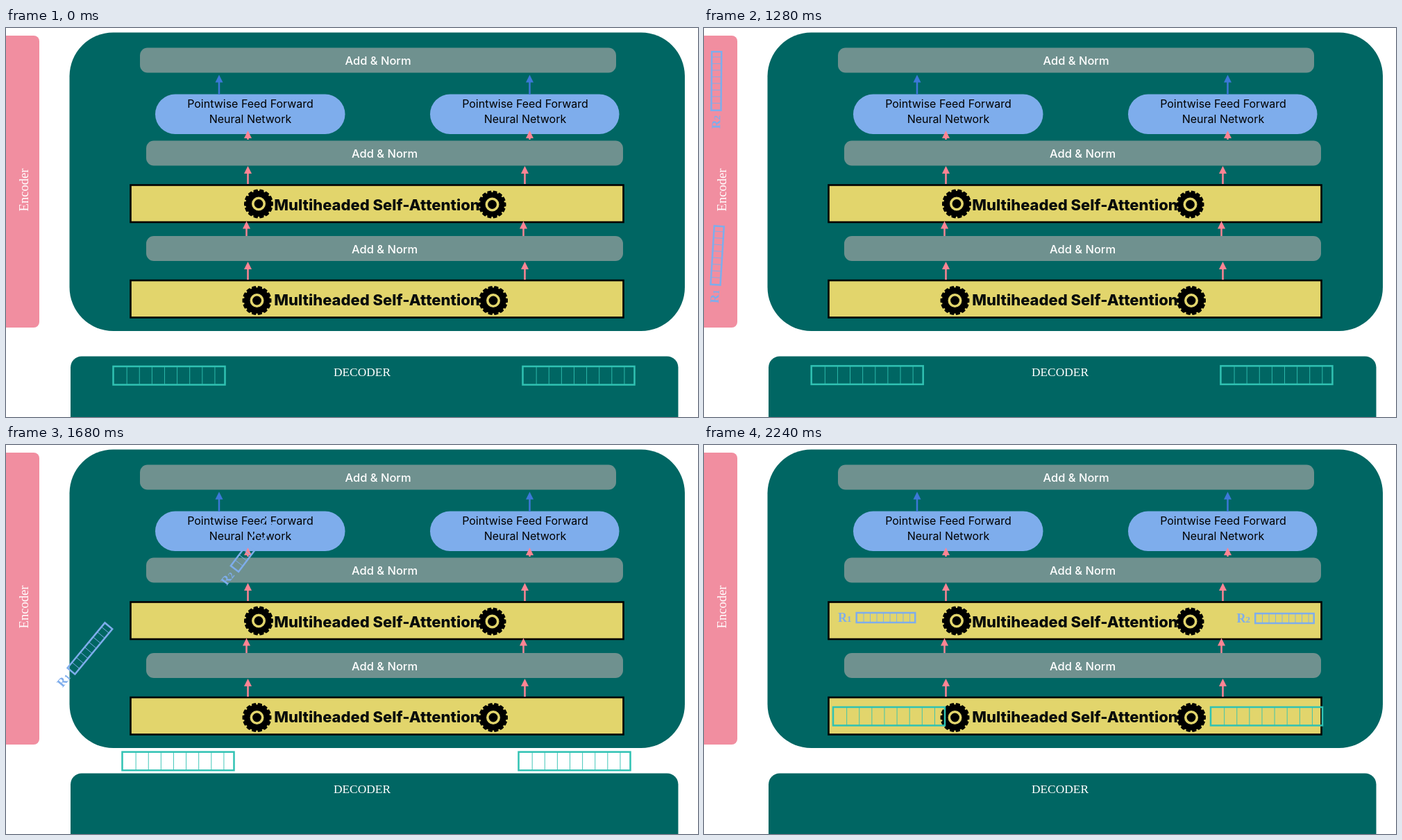
Recreate the animation shown at these times as an HTML page with a canvas. Size 997x561 px, loop 2.72 s.

```html
<!DOCTYPE html>
<html lang="en">
<head>
<meta charset="utf-8">
<title>Encoder and decoder</title>
<style>
html, body { margin: 0; width: 100%; height: 100%; overflow: hidden; background: #fff; }
canvas { display: block; }
</style>
</head>
<body>
<canvas id="stage" width="997" height="561"></canvas>
<script>
const ctx = document.getElementById('stage').getContext('2d');
const LOOP = 2720, STEP = 40;
const GREEN = '#006663', GREY = '#6f918f', BLUE = '#7eadec', YELLOW = '#e2d56c';
const PINK = '#f18ea0', ROSE = '#ff8494', ROYAL = '#3c78d8', TEAL = '#30c2b3', INK = '#060b0b';
const SANS = 'Inter, "Open Sans", sans-serif';
const SERIF = '"Liberation Serif", "Noto Serif", serif';

const clamp = v => Math.min(1, Math.max(0, v));
const lerp = (a, b, p) => a + (b - a) * p;
const easeInOut = u => u < 0.5 ? 2 * u * u : 1 - 2 * (1 - u) ** 2;

function box(x, y, w, h, r, color) {
  ctx.fillStyle = color;
  ctx.beginPath();
  ctx.roundRect(x, y, w, h, r);
  ctx.fill();
}

function text(str, x, y, font, color, align = 'center') {
  ctx.font = font;
  ctx.fillStyle = color;
  ctx.textAlign = align;
  ctx.fillText(str, x, y);
}

function arrow(x, from, to, color) {
  ctx.fillStyle = color;
  ctx.fillRect(x - 1.25, to + 9, 2.5, from - to - 9);
  ctx.beginPath();
  ctx.moveTo(x, to);
  ctx.lineTo(x + 5.5, to + 11);
  ctx.lineTo(x - 5.5, to + 11);
  ctx.fill();
}

function gear(x, y, r) {
  const teeth = 14, pitch = 2 * Math.PI / teeth;
  ctx.fillStyle = '#000';
  ctx.beginPath();
  for (let i = 0; i < teeth; i++) {
    const a = i * pitch;
    ctx.arc(x, y, r, a - pitch * 0.32, a + pitch * 0.32);
    ctx.arc(x, y, r - 2.4, a + pitch * 0.4, a + pitch * 0.6);
  }
  ctx.fill();
  ctx.strokeStyle = YELLOW;
  ctx.lineWidth = 3.6;
  ctx.beginPath();
  ctx.arc(x, y, 8.2, 0, 2 * Math.PI);
  ctx.stroke();
}

// A row of nine cells; the first is slightly wider.
function cells(x, y, w, h, color) {
  ctx.strokeStyle = color;
  ctx.lineWidth = 2.5;
  ctx.strokeRect(x, y, w, h);
  ctx.lineWidth = 0.9;
  ctx.beginPath();
  for (let i = 0; i < 8; i++) {
    const cx = x + w * (0.122 + 0.1125 * i);
    ctx.moveTo(cx, y);
    ctx.lineTo(cx, y + h);
  }
  ctx.stroke();
}

function attention(y) {
  box(179.5, y, 710, 53.5, 0, YELLOW);
  ctx.strokeStyle = '#000';
  ctx.lineWidth = 2.6;
  ctx.strokeRect(179.5, y, 710, 53.5);
  text('Multiheaded Self-Attention', 534.5, y + 36, '800 22px ' + SANS, INK);
}

function addNorm(x, y, w) {
  box(x, y, w, 36, 11, GREY);
  text('Add & Norm', x + w / 2, y + 24.5, '500 16.5px ' + SANS, '#fff');
}

function feedForward(x, w, cx) {
  box(x, 95.5, w, 57.5, 28.7, BLUE);
  text('Pointwise Feed Forward', cx, 115, '16px ' + SANS, '#000');
  text('Neural Network', cx, 137, '16px ' + SANS, '#000');
}

function scene() {
  ctx.fillStyle = '#fff';
  ctx.fillRect(0, 0, 997, 561);
  box(-20, 11, 68, 421, 8, PINK);
  ctx.save();
  ctx.translate(32, 233.5);
  ctx.rotate(-Math.PI / 2);
  text('Encoder', 0, 0, '18.6px ' + SERIF, '#fff');
  ctx.restore();

  box(91.5, 6.5, 886.5, 430.5, 63, GREEN);
  box(93, 473.5, 875.5, 120, 16, GREEN);
  text('DECODER', 513, 502, '17.4px ' + SERIF, '#fff');

  addNorm(193, 28.5, 686);
  addNorm(202, 162.5, 687);
  addNorm(202, 300, 687);
  feedForward(215, 273.5, 352);
  feedForward(611, 272.5, 748);
  attention(226.5);
  attention(364);
  gear(364, 253.5, 21);
  gear(700.5, 254.5, 20);
  gear(361.5, 393, 21);
  gear(702, 393, 21);

  for (const [left, right, from, to] of [
    [348.5, 747.5, 225, 199], [346.5, 745.5, 300, 278.5],
    [348.5, 747.5, 363, 337], [348.5, 754.5, 161, 148]
  ]) {
    arrow(left, from, to, ROSE);
    arrow(right, from, to, ROSE);
  }
  arrow(307, 96, 67.5, ROYAL);
  arrow(754.5, 96, 67.5, ROYAL);
}

function result(digit, x, y, turn) {
  ctx.save();
  ctx.translate(x, y);
  ctx.rotate(turn * Math.PI / 2);
  text('R', -56, 6, 'bold 18px ' + SERIF, BLUE, 'left');
  text(digit, -43, 6, 'bold 13px ' + SERIF, BLUE, 'left');
  cells(-29.3, -7, 84.5, 14, BLUE);
  ctx.restore();
}

function glow(x, y, alpha) {
  ctx.save();
  ctx.translate(x, y);
  ctx.scale(18, 60);
  const g = ctx.createRadialGradient(0, 0, 0, 0, 0, 1);
  g.addColorStop(0, `rgba(126,173,236,${alpha})`);
  g.addColorStop(0.75, `rgba(126,173,236,${alpha * 0.8})`);
  g.addColorStop(1, 'rgba(126,173,236,0)');
  ctx.fillStyle = g;
  ctx.fillRect(-1, -1, 2, 2);
  ctx.restore();
}

function draw(time) {
  const t = Math.floor(time / STEP) * STEP;
  const p = easeInOut(clamp((t - 1226) / 1000));
  const linear = clamp((t - 1240) / 1000);
  scene();

  const y = lerp(488, 378, p);
  cells(lerp(154.5, 186, p), y, 161, 26.5, TEAL);
  cells(lerp(744.5, 730, p), y, 161, 26.5, TEAL);

  if (t < 720) return;
  if (t < 800) {
    const a = t < 760 ? 0.16 : 0.1;
    glow(16, 86, a);
    glow(16, 335, a);
  }
  ctx.globalAlpha = t < 760 ? 0 : t < 800 ? 0.55 : 1;
  result('1', lerp(17, 249, p), lerp(341.5, 249, p), linear - 1);
  result('2', lerp(13, 823.5, p), lerp(88.5, 250, p), p - 1);
  ctx.globalAlpha = 1;
}

const start = performance.now();
function tick() {
  draw((performance.now() - start) % LOOP);
  requestAnimationFrame(tick);
}
tick();
</script>
</body>
</html>
```
